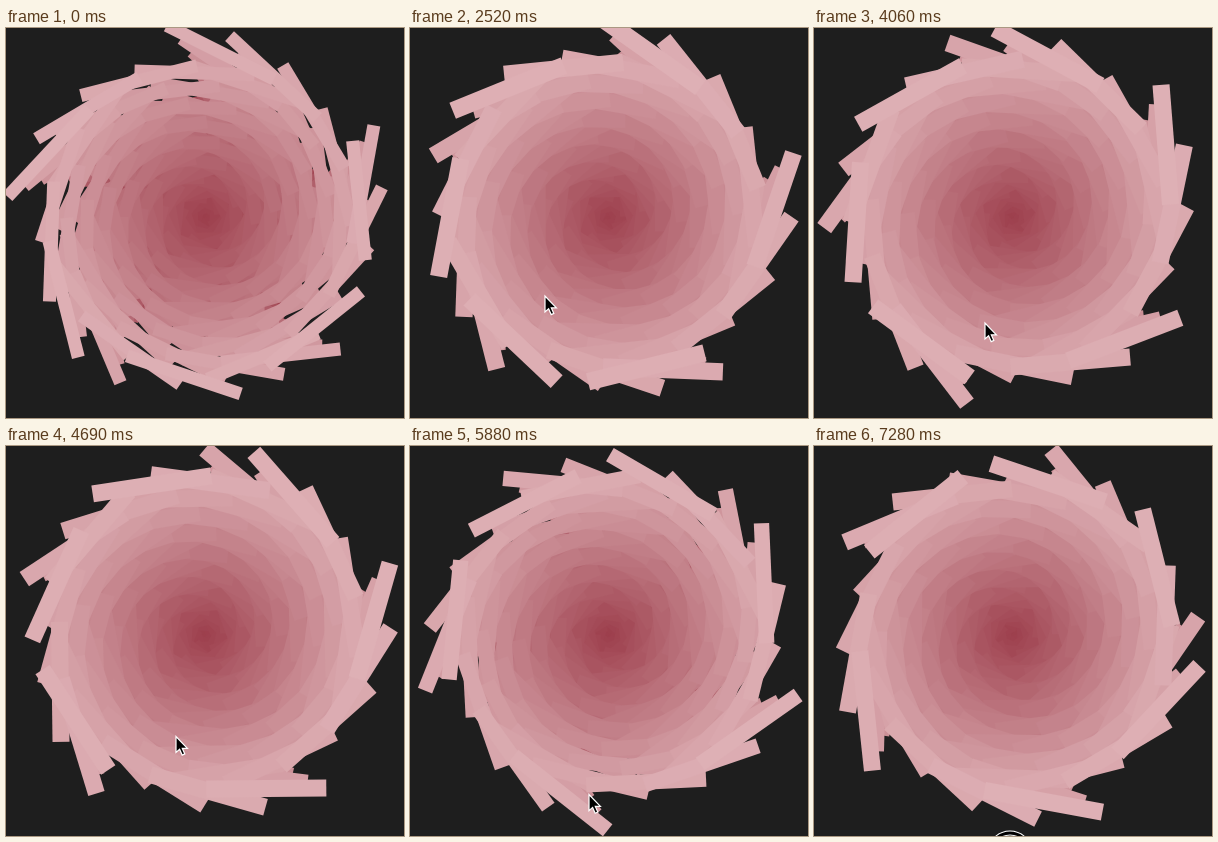
An HTML page with a canvas for the animation above (7350 ms loop, 398 px wide and 390 px high).

```html
<!DOCTYPE html>
<html>
<head>
<meta charset="utf-8">
<style>
  html, body { margin: 0; width: 100%; height: 100%; overflow: hidden; background: #1e1e1e; }
  canvas { display: block; }
</style>
</head>
<body>
<canvas id="stage" width="398" height="390"></canvas>
<script>
const ctx = document.getElementById('stage').getContext('2d');
const LOOP = 7350, STEP = 70, COUNT = 200, LENGTH = 120;
const INNER = [154, 58, 72], OUTER = [222, 176, 181];

// Each key is [time, ...values]
const WIDTH = [[0, 13], [420, 13], [980, 17.5], [4900, 17], [5200, 19], [5500, 19], [6160, 13], [6650, 13], [7210, 17]];
const PRESS = [[5040, 0], [5250, 1], [5460, 1], [5740, 0]];
const POINTER = [[0, 215, 430], [500, 210, 420], [1400, 183, 310], [2520, 135, 269],
  [4060, 171, 296], [5320, 169, 287], [5600, 170, 292], [6200, 190, 420], [7280, 196, 407]];

const ease = x => x * x * (3 - 2 * x);

function at(keys, t) {
  const n = keys.findIndex(k => k[0] > t);
  if (n === 0) return keys[0].slice(1);
  if (n < 0) return keys[keys.length - 1].slice(1);
  const a = keys[n - 1], b = keys[n];
  const k = ease((t - a[0]) / (b[0] - a[0]));
  return a.slice(1).map((v, j) => v + (b[j + 1] - v) * k);
}

function drawBar(i, turn, width, press) {
  const depth = i / COUNT;
  const rgb = OUTER.map((v, j) => Math.round(v + (INNER[j] - v) * depth));
  const x = -LENGTH + 15 * (i % 5);
  const y = -158 * (1 - depth) - width / 2;
  ctx.save();
  ctx.translate(199, 189);
  ctx.rotate(turn - i);   // one radian between neighbours
  ctx.fillStyle = `rgb(${rgb})`;
  if (press > 0) {
    ctx.shadowColor = `rgba(226,182,104,${0.3 * press})`;
    ctx.shadowBlur = 24;
  }
  ctx.fillRect(x, y, LENGTH, width);
  if (press > 0) {
    ctx.shadowColor = 'transparent';
    ctx.strokeStyle = `rgba(236,206,164,${0.8 * press})`;
    ctx.lineWidth = 1;
    ctx.strokeRect(x + 0.5, y + 0.5, LENGTH - 1, width - 1);
  }
  ctx.restore();
}

function drawPointer(x, y, clicked) {
  ctx.save();
  ctx.translate(x, y);
  if (clicked) {
    ctx.beginPath();
    ctx.arc(0, 0, 20, 0, 2 * Math.PI);
    for (const [color, width] of [['#fff', 5], ['#000', 3]]) {
      ctx.strokeStyle = color;
      ctx.lineWidth = width;
      ctx.stroke();
    }
  }
  ctx.fillStyle = '#000';
  ctx.strokeStyle = '#fff';
  ctx.lineWidth = 1.2;
  const arrow = new Path2D('M0 -1V15L3.6 11.8L6.2 17.6L8.8 16.4L6.3 10.8H11.4Z');
  ctx.fill(arrow);
  ctx.stroke(arrow);
  ctx.restore();
}

function draw(t) {
  const turn = (313.1 + 0.0326 * t) * Math.PI / 180;
  const [width] = at(WIDTH, t), [press] = at(PRESS, t);
  ctx.fillStyle = '#1e1e1e';
  ctx.fillRect(0, 0, 398, 390);
  for (let i = COUNT - 1; i >= 0; i--) drawBar(i, turn, width, press);
  drawPointer(...at(POINTER, t), press > 0 || t >= 7210);
}

const start = performance.now();
function tick() {
  const t = (performance.now() - start) % LOOP;
  draw(Math.floor(t / STEP) * STEP);
  requestAnimationFrame(tick);
}
tick();
</script>
</body>
</html>
```
